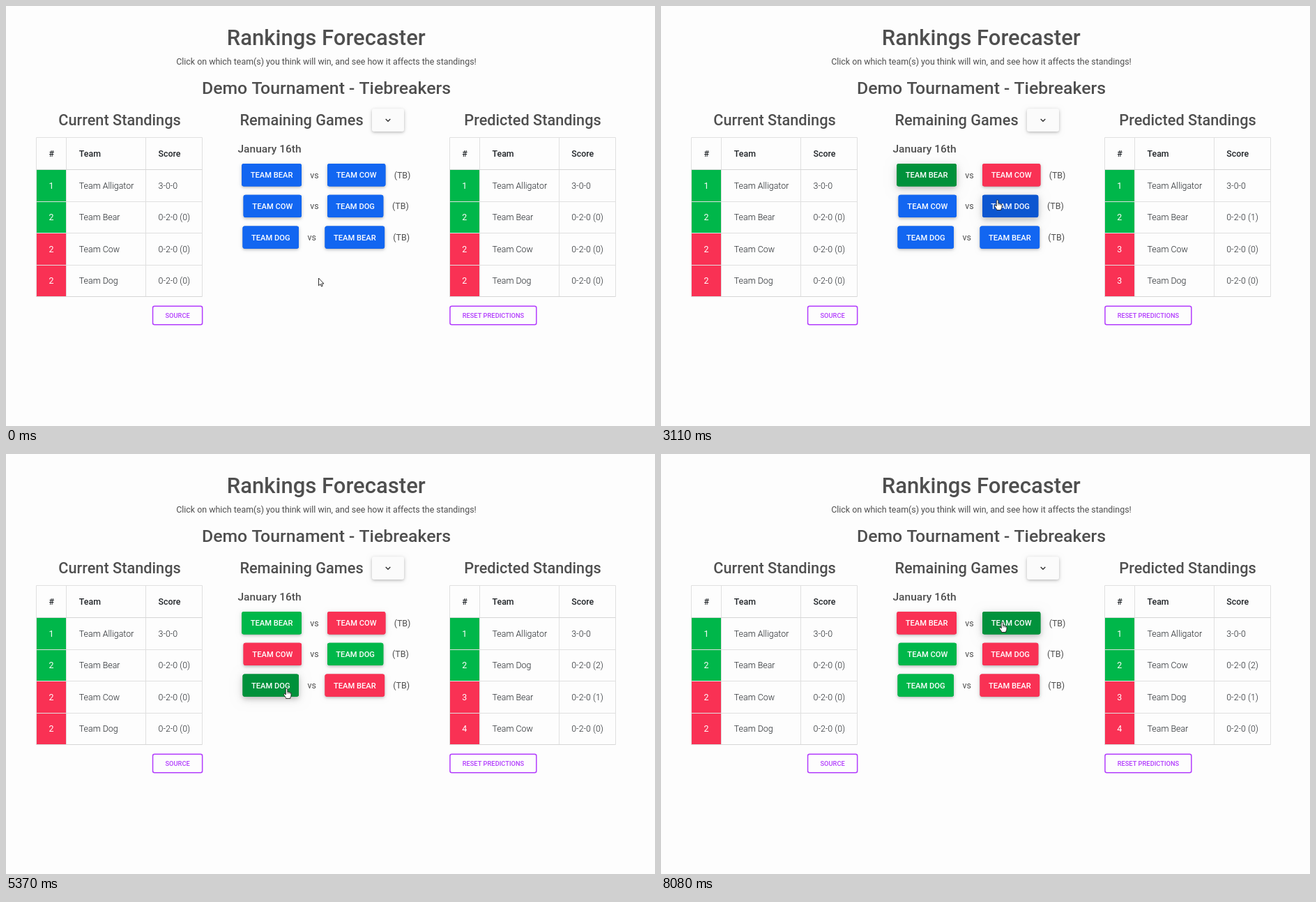
These frames come from a looping animation (931 px wide and 602 px high, 9.82 s). An HTML page with a canvas:

```html
<!DOCTYPE html>
<html lang="en">
<head>
<meta charset="utf-8">
<title>Rankings Forecaster</title>
<style>
html, body { margin: 0; width: 100%; height: 100%; overflow: hidden; background: #fdfdfd; }
canvas { display: block; width: 931px; height: 602px; }
</style>
</head>
<body>
<canvas id="stage"></canvas>
<script>
const W = 931, H = 602, LOOP = 9820, FADE = 150, RIPPLE = 500;
const ZOOM = 0.776; // page zoom applied to all rem sizes
const canvas = document.getElementById('stage');
const ctx = canvas.getContext('2d');
const dpr = window.devicePixelRatio || 1;
canvas.width = W * dpr;
canvas.height = H * dpr;

const INK = '#4f4f4f', DARK = '#212529', LINE = '#e0e0e0', PURPLE = '#b23cfd';
const PALETTE = {
  blue: [18, 102, 241], blueDark: [12, 86, 208],
  green: [0, 183, 74], greenDark: [0, 145, 59],
  red: [249, 49, 84], redDark: [248, 12, 53],
};
const rgb = name => `rgb(${PALETTE[name]})`;

// Each button fades to the named colour from the given time on.
const BUTTONS = [
  { label: 'TEAM BEAR', x: 338.2, y: 226, w: 85.8,
    states: [[1440, 'blueDark'], [2230, 'greenDark'], [3390, 'green'], [7680, 'red']] },
  { label: 'TEAM COW', x: 461, y: 226, w: 83.4,
    states: [[2230, 'red'], [7095, 'redDark'], [7680, 'greenDark']] },
  { label: 'TEAM COW', x: 340.6, y: 270.7, w: 83.4,
    states: [[3480, 'red'], [5850, 'redDark'], [6730, 'greenDark'], [7590, 'green']] },
  { label: 'TEAM DOG', x: 461, y: 270.7, w: 80.3,
    states: [[2890, 'blueDark'], [3480, 'greenDark'], [4410, 'green'], [6730, 'red']] },
  { label: 'TEAM DOG', x: 339.5, y: 315.4, w: 80.5,
    states: [[4010, 'blueDark'], [4500, 'greenDark'], [6640, 'green']] },
  { label: 'TEAM BEAR', x: 457.5, y: 315.4, w: 85.6,
    states: [[4500, 'red']] },
];
const BUTTON_H = 32.4;

// time of press, button index
const PRESSES = [[2140, 0], [3390, 3], [4410, 4], [6640, 2], [7590, 1]];

// time, then rank, team and points of the places below the leader
const PREDICTIONS = [
  [0, [2, 'Bear', 0], [2, 'Cow', 0], [2, 'Dog', 0]],
  [2230, [2, 'Bear', 1], [3, 'Cow', 0], [3, 'Dog', 0]],
  [3480, [2, 'Bear', 1], [2, 'Dog', 1], [4, 'Cow', 0]],
  [4500, [2, 'Dog', 2], [3, 'Bear', 1], [4, 'Cow', 0]],
  [6730, [2, 'Dog', 1], [2, 'Bear', 1], [2, 'Cow', 1]],
  [7680, [2, 'Cow', 2], [3, 'Dog', 1], [4, 'Bear', 0]],
];

// time, x, y of the pointer tip
const PATH = [
  [870, 448.5, 390], [1200, 427, 328], [1450, 402, 255], [1610, 395.5, 239.5],
  [1850, 392.5, 238.5], [1880, 390, 238.5],
  [2560, 390, 238.5], [2750, 432, 261], [2930, 470, 275], [3110, 482.5, 278],
  [3220, 488.5, 281.5],
  [3750, 488.5, 281.5], [3930, 436, 314], [4060, 408, 327], [4190, 392.5, 334],
  [4280, 391, 335],
  [4850, 391, 335], [5370, 402.5, 336],
  [5650, 428, 320], [5850, 426, 294], [6050, 408, 287], [6280, 402, 285],
  [6820, 402, 285], [6980, 438, 267], [7130, 466.5, 252], [7270, 483, 243],
  [7390, 489.5, 241],
];

const HAND = new Path2D('M-1.3 8V1.2Q-1.3 0 0 0Q1.3 0 1.3 1.2V5Q2.7 4.3 3.3 5.5Q4.6 5 5.1 6.1' +
  'Q6.4 5.8 6.5 7.2V10Q6.4 12 5.3 13V14.5H-1V13.4L-4 9.3Q-4.3 7.8 -3 7.6Q-2 7.8 -1.3 9Z');
const KNUCKLES = new Path2D('M1.3 5V7.6M3.3 5.5V7.8M5.1 6.1V8');
const ARROW = new Path2D('M0 0V10.8L2.5 8.6L4 12L5.7 11.3L4.2 8H7.5Z');

const clamp = v => Math.max(0, Math.min(1, v));
const mix = (a, b, p) => a + (b - a) * p;

function text(str, x, middle, rem, weight, color, align = 'left') {
  const size = rem * 16 * ZOOM;
  ctx.font = `${weight} ${size}px Roboto, sans-serif`;
  ctx.textAlign = align;
  ctx.fillStyle = color;
  ctx.fillText(str, x, middle + size * 0.356);
}

function roundRect(x, y, w, h, r = 3) {
  ctx.beginPath();
  ctx.roundRect(x, y, w, h, r);
}

function shadowBox(x, y, w, h, color, lift = 0) {
  const shadows = [
    [mix(2, 4, lift), mix(5, 10, lift), 0.2],
    [mix(2, 4, lift), mix(10, 20, lift), 0.1],
  ];
  ctx.save();
  ctx.fillStyle = color;
  roundRect(x, y, w, h);
  for (const [dy, blur, alpha] of shadows) {
    ctx.shadowColor = `rgba(0,0,0,${alpha})`;
    ctx.shadowOffsetY = dy * ZOOM * dpr;
    ctx.shadowBlur = blur * ZOOM * dpr;
    ctx.fill();
  }
  ctx.restore();
}

function line(x1, y1, x2, y2, color = LINE) {
  ctx.strokeStyle = color;
  ctx.lineWidth = 1;
  ctx.beginPath();
  ctx.moveTo(x1, y1);
  ctx.lineTo(x2, y2);
  ctx.stroke();
}

function table(dx, places) {
  const edge = x => Math.round(x + dx) + 0.5;
  const left = edge(43), right = edge(281.4);
  const rowY = i => Math.round(234.8 + i * 45.4 - 0.4) + 0.5;
  text('#', dx + 65.3, 211.7, 1, 500, DARK, 'center');
  text('Team', dx + 104.8, 211.7, 1, 500, DARK);
  text('Score', dx + 218.5, 211.7, 1, 500, DARK);

  [[1, 'Alligator', null], ...places].forEach(([rank, team, points], i) => {
    const middle = 257.7 + i * 45.35;
    ctx.fillStyle = rgb(i < 2 ? 'green' : 'red');
    ctx.fillRect(left, rowY(i), edge(86) - left, rowY(i + 1) - rowY(i));
    text(rank, dx + 65, middle, 1, 400, '#fff', 'center');
    text('Team ' + team, dx + 104.8, middle, 1, 300, DARK);
    text(points === null ? '3-0-0' : `0-2-0 (${points})`, dx + 218.5, middle, 1, 300, DARK);
  });

  for (const x of [43, 86, 200, 281.4]) line(edge(x), 188.5, edge(x), rowY(4));
  line(left, 188.5, right, 188.5);
  for (let i = 0; i < 5; i++) line(left, rowY(i), right, rowY(i), i % 4 ? LINE : '#d6d6d6');
}

function outlineButton(label, x, w) {
  ctx.strokeStyle = PURPLE;
  ctx.lineWidth = 1.5;
  roundRect(x + 0.75, 430.3, w - 1.5, 26.5, 2.5);
  ctx.stroke();
  text(label, x + w / 2, 443.7, 0.75, 500, PURPLE, 'center');
}

function teamButton(button, index, t) {
  const { label, x, y, w, states } = button;
  let from = 'blue', to = 'blue', since = -FADE;
  for (const [time, name] of states) {
    if (t >= time) [from, to, since] = [to, name, time];
  }
  const p = clamp((t - since) / FADE);
  const eased = p * p * (3 - 2 * p);
  const color = PALETTE[from].map((v, i) => Math.round(mix(v, PALETTE[to][i], eased)));
  const lift = name => name.endsWith('Dark') ? 1 : 0;
  shadowBox(x, y, w, BUTTON_H, `rgb(${color})`, mix(lift(from), lift(to), eased));

  const press = PRESSES.find(([time, target]) => target === index && t >= time && t < time + RIPPLE);
  if (press) ripple(button, press[0], (t - press[0]) / RIPPLE);
  text(label, x + w / 2, y + 16.2, 0.9, 500, '#fff', 'center');
}

function ripple({ x, y, w }, time, p) {
  const [cx, cy] = pointerAt(time);
  const radius = 1 + 90 * (1 - (1 - p) ** 2);
  const glow = ctx.createRadialGradient(cx, cy, 0, cx, cy, radius);
  const alpha = 0.35 * (1 - p);
  glow.addColorStop(0, `rgba(255,255,255,${alpha})`);
  glow.addColorStop(0.5, `rgba(255,255,255,${alpha})`);
  glow.addColorStop(1, 'rgba(255,255,255,0)');
  roundRect(x, y, w, BUTTON_H);
  ctx.fillStyle = glow;
  ctx.fill();
}

// Cubic Hermite through the path points; pauses have no slope.
function pointerAt(t) {
  const last = PATH.length - 1;
  if (t <= PATH[0][0]) return PATH[0].slice(1);
  if (t >= PATH[last][0]) return PATH[last].slice(1);
  const i = PATH.findIndex(point => point[0] > t) - 1;
  const a = PATH[i], b = PATH[i + 1];
  const span = b[0] - a[0], u = (t - a[0]) / span;
  const slope = (k, axis) => {
    if (k === 0 || k === last) return 0;
    const before = (PATH[k][axis] - PATH[k - 1][axis]) / (PATH[k][0] - PATH[k - 1][0]);
    const after = (PATH[k + 1][axis] - PATH[k][axis]) / (PATH[k + 1][0] - PATH[k][0]);
    return before * after > 0 ? 2 * before * after / (before + after) : 0;
  };
  return [1, 2].map(axis => {
    const v = u * u * (3 - 2 * u);
    return mix(a[axis], b[axis], v)
      + span * u * (1 - u) * ((1 - u) * slope(i, axis) - u * slope(i + 1, axis));
  });
}

function pointer(t) {
  const [x, y] = pointerAt(t);
  const over = BUTTONS.some(b => x > b.x && x < b.x + b.w && y > b.y && y < b.y + BUTTON_H);
  const shape = over ? HAND : ARROW;
  ctx.save();
  ctx.translate(x, y);
  ctx.lineJoin = 'round';
  ctx.lineWidth = 0.9;
  ctx.fillStyle = '#fff';
  ctx.strokeStyle = '#1c1c1c';
  ctx.fill(shape);
  ctx.stroke(shape);
  if (over) {
    ctx.lineWidth = 0.6;
    ctx.stroke(KNUCKLES);
  }
  ctx.restore();
}

function headings() {
  text('Rankings Forecaster', 459.3, 44.5, 2.5, 500, INK, 'center');
  text('Click on which team(s) you think will win, and see how it affects the standings!',
    459.5, 79.3, 1, 400, INK, 'center');
  text('Demo Tournament - Tiebreakers', 459.5, 116.8, 2, 500, INK, 'center');
  text('Current Standings', 163, 163.3, 1.75, 500, INK, 'center');
  text('Remaining Games', 424, 163.3, 1.75, 500, INK, 'center');
  text('Predicted Standings', 755.5, 163.3, 1.75, 500, INK, 'center');
  text('January 16th', 332.5, 204.5, 1.25, 500, INK);
}

function dropdown() {
  shadowBox(525, 147.3, 46, 32.5, '#fbfbfb');
  ctx.strokeStyle = '#333';
  ctx.lineWidth = 1.4;
  ctx.beginPath();
  ctx.moveTo(544.7, 162);
  ctx.lineTo(548, 165.2);
  ctx.lineTo(551.3, 162);
  ctx.stroke();
}

function draw() {
  const t = performance.now() % LOOP;
  ctx.setTransform(dpr, 0, 0, dpr, 0, 0);
  ctx.fillStyle = '#fdfdfd';
  ctx.fillRect(0, 0, W, H);

  headings();
  dropdown();
  table(0, PREDICTIONS[0].slice(1));
  table(592.7, PREDICTIONS.filter(([time]) => t >= time).pop().slice(1));
  outlineButton('SOURCE', 209.8, 72.6);
  outlineButton('RESET PREDICTIONS', 636.2, 125.4);

  [[436.3, 556.7], [436.2, 554], [432.5, 555.3]].forEach(([versus, note], row) => {
    const middle = 242.2 + row * 44.7;
    text('vs', versus, middle, 1, 400, INK);
    text('(TB)', note, middle, 1, 400, INK);
  });
  BUTTONS.forEach((button, i) => teamButton(button, i, t));
  pointer(t);
  requestAnimationFrame(draw);
}
draw();
</script>
</body>
</html>
```
